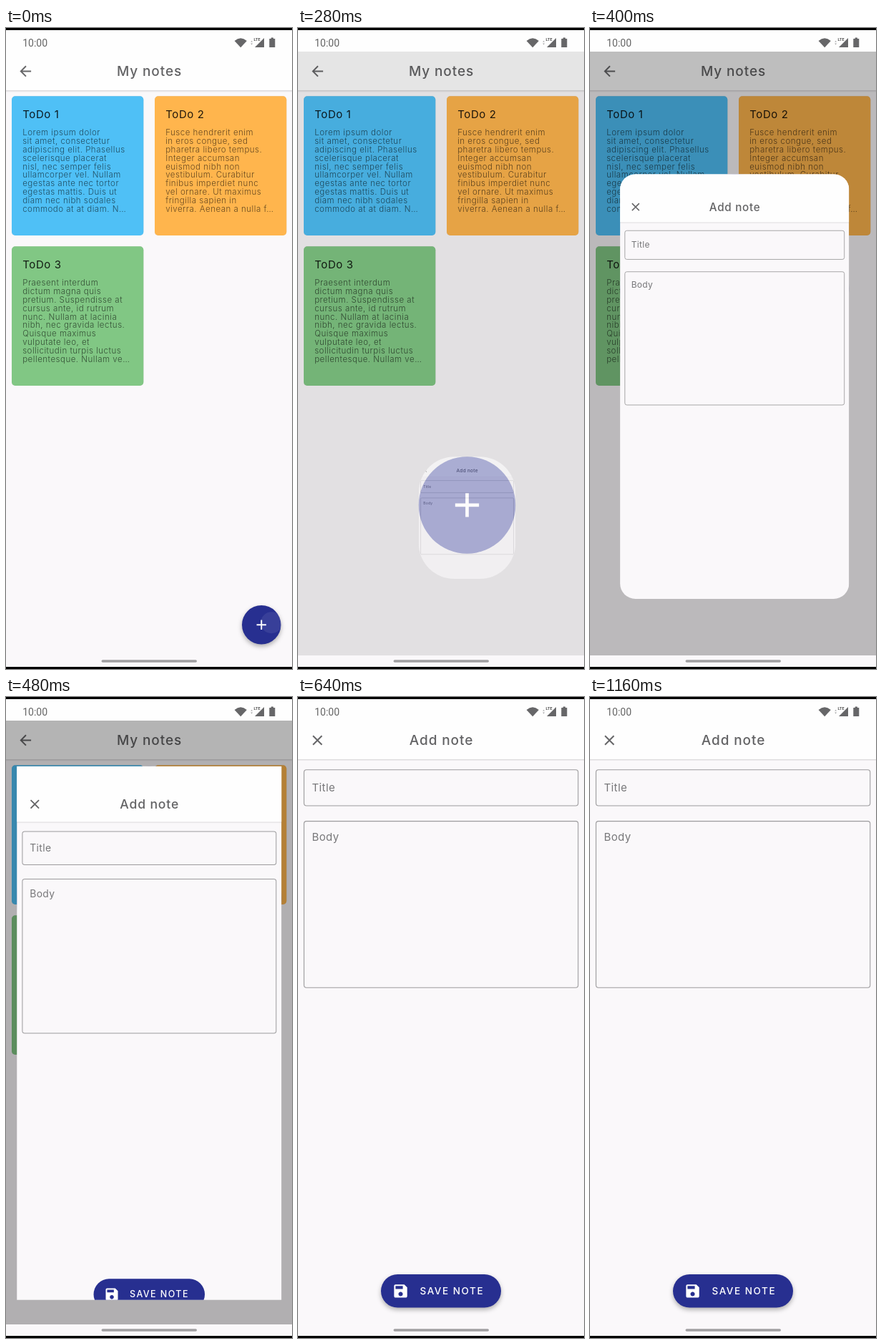
An HTML page for the animation above (1.2 s loop, 400 by 896 pixels).

```html
<!DOCTYPE html>
<html lang="en">
<head>
<meta charset="utf-8">
<title>My notes</title>
<style>
  html, body { margin: 0; width: 100%; height: 100%; overflow: hidden; background: #000; }
  svg { display: block; width: 100%; height: 100%; }
  text { font-family: Inter, "Open Sans", sans-serif; white-space: pre; }
  .bar { font-size: 19px; font-weight: 450; letter-spacing: .9px; fill: #636365; text-anchor: middle; }
  .head { font-size: 15px; letter-spacing: .6px; fill: #000; fill-opacity: .87; }
  .body { font-size: 11.5px; font-weight: 300; letter-spacing: .5px; fill: #000; fill-opacity: .6; }
  .label { font-size: 15px; letter-spacing: .4px; fill: #777779; }
  .save { font-size: 13.5px; font-weight: 500; letter-spacing: 1.55px; fill: #fff; }
  .clock { font: 14px Roboto, sans-serif; fill: #666; }
  .lte { font: bold 5.5px Roboto, sans-serif; fill: #555; }
  .icon { fill: #666668; }
  .field { fill: none; stroke: #9c9b9d; stroke-width: 1.1; }
  .card { filter: drop-shadow(0 .5px .7px rgba(0, 0, 0, .18)); }
  .lift { filter: drop-shadow(0 3px 3px rgba(0, 0, 0, .3)); }
</style>
</head>
<body>
<svg viewBox="0 0 400 896" preserveAspectRatio="none">
  <defs>
    <clipPath id="mask"><rect id="hole"/></clipPath>
    <clipPath id="disc"><circle r="27.25"/></clipPath>
    <path id="arc" d="M357.25 807Q200 807 200 33"/>
    <linearGradient id="fall" x1="0" y1="0" x2="0" y2="1">
      <stop offset="0" stop-color="#000" stop-opacity=".14"/>
      <stop offset="1" stop-color="#000" stop-opacity="0"/>
    </linearGradient>
    <g id="fabFace">
      <circle r="27.25" fill="#272f90"/>
      <path d="M-6.7 0H6.7M0-6.7V6.7" stroke="#fff" stroke-width="1.9"/>
    </g>
  </defs>

  <rect y="3" width="400" height="890" fill="#faf8fa"/>

  <g id="list">
    <rect y="87" width="400" height="3" fill="url(#fall)"/>
    <rect y="3" width="400" height="84" fill="#fefefe"/>
    <path class="icon" transform="translate(15.5 48.7) scale(.98)"
      d="M20 11H7.83l5.59-5.59L12 4l-8 8 8 8 1.41-1.41L7.83 13H20z"/>
    <text class="bar" x="200.5" y="67.3">My notes</text>
    <g id="cards"></g>
    <g id="fab" transform="translate(357.25 834.25)">
      <use href="#fabFace" class="lift"/>
      <circle id="ripple" cx="14" cy="-3" fill="#fff" fill-opacity=".08" clip-path="url(#disc)"/>
    </g>
  </g>

  <rect id="scrim" y="33" width="400" height="844"/>

  <g id="box" clip-path="url(#mask)">
    <use id="start" href="#fabFace"/>
    <g id="page">
      <g transform="translate(0 -3.2)">
        <rect y="3.2" width="400" height="874" fill="#faf8fa"/>
        <rect y="87" width="400" height="2.5" fill="url(#fall)"/>
        <rect y="3.2" width="400" height="83.8" fill="#fefefe"/>
        <path class="icon" transform="translate(15.3 48.6) scale(.99)"
          d="M19 6.41 17.59 5 12 10.59 6.41 5 5 6.41 10.59 12 5 17.59 6.41 19 12 13.41 17.59 19 19 17.59 13.41 12z"/>
        <text class="bar" x="200.5" y="67.3">Add note</text>
        <rect class="field" x="8.4" y="101.8" width="383.4" height="50.2" rx="3.5"/>
        <text class="label" x="19.5" y="131.7">Title</text>
        <rect class="field" x="8.4" y="173.6" width="383.4" height="232.6" rx="3.5"/>
        <text class="label" x="19.5" y="201.4">Body</text>
        <g id="save">
          <rect id="pill" x="116" y="807" width="168" height="46.6" rx="23.3" fill="#272f90"/>
          <path fill="#fff" transform="translate(131.3 818.2) scale(1.02)"
            d="M17 3H5c-1.11 0-2 .9-2 2v14c0 1.1.89 2 2 2h14c1.1 0 2-.9 2-2V7l-4-4zm-5 16c-1.66 0-3-1.34-3-3s1.34-3 3-3 3 1.34 3 3-1.34 3-3 3zm3-10H5V5h10v4z"/>
          <text class="save" x="170.5" y="835.2">SAVE NOTE</text>
        </g>
      </g>
    </g>
  </g>

  <g id="system">
    <text class="clock" x="23.2" y="25.6">10:00</text>
    <g class="icon">
      <path d="M319.6 18Q328.2 10.6 336.8 18L328.2 27.2z"/>
      <path d="M361 14V27H348L355.5 19.5z"/>
      <path d="M342.2 19.6l1.4-1.8 1.4 1.8zM342.2 21.6l1.4 1.8 1.4-1.8z" opacity=".6"/>
      <path d="M370.6 13.6h3.4v1.5h2.3v12h-8v-12h2.3z"/>
    </g>
    <text class="lte" x="346.6" y="18.4">LTE</text>
    <rect x="133.5" y="883.2" width="133.5" height="3.6" rx="1.8" fill="#a09fa1"/>
    <path d="M0 0H400V3H0zM0 893H400V896H0z"/>
  </g>
</svg>
<script>
const $ = id => document.getElementById(id);
const LOOP = 1200, STEP = 40;
const BEGIN = 137, SPAN = 512, SETTLE = 620;
const FAB = 54.5, WIDE = 400, TALL = 844;

const notes = [
  [8, 95.2, '#4fc0f6', 'ToDo 1', `Lorem ipsum dolor
sit amet, consectetur
adipiscing elit. Phasellus
scelerisque placerat
nisl, nec semper felis
ullamcorper vel. Nullam
egestas ante nec tortor
egestas mattis. Duis ut
diam nec nibh sodales
commodo at at diam. N…`],
  [208, 95.2, '#ffb54d', 'ToDo 2', `Fusce hendrerit enim
in eros congue, sed
pharetra libero tempus.
Integer accumsan
euismod nibh non
vestibulum. Curabitur
finibus imperdiet nunc
vel ornare. Ut maximus
fringilla sapien in
viverra. Aenean a nulla f…`],
  [8, 305.2, '#81c784', 'ToDo 3', `Praesent interdum
dictum magna quis
pretium. Suspendisse at
cursus ante, id rutrum
nunc. Nullam at lacinia
nibh, nec gravida lectus.
Quisque maximus
vulputate leo, et
sollicitudin turpis luctus
pellentesque. Nullam ve…`]
];

$('cards').innerHTML = notes.map(([x, y, fill, head, body]) => `
  <g transform="translate(${x} ${y})">
    <rect class="card" width="184.3" height="194.8" rx="5" fill="${fill}"/>
    <text class="head" x="15.2" y="31">${head}</text>
    ${body.split('\n').map((line, i) =>
      `<text class="body" x="15.2" y="${54.8 + i * 11.9}">${line}</text>`).join('')}
  </g>`).join('');

const lerp = (a, b, p) => a + (b - a) * p;
const part = (p, a, b) => Math.min(1, Math.max(0, (p - a) / (b - a)));
const set = (id, attrs) => {
  for (const k in attrs) $(id).setAttribute(k, attrs[k]);
};
const show = (id, on) => set(id, { display: on ? 'inline' : 'none' });

// cubic-bezier(.4, 0, .2, 1)
function ease(x) {
  let lo = 0, hi = 1;
  for (let i = 0; i < 24; i++) {
    const s = (lo + hi) / 2, r = 1 - s;
    if (1.2 * r * r * s + .6 * r * s * s + s ** 3 < x) lo = s; else hi = s;
  }
  return lo * lo * (3 - 2 * lo);
}

const arc = $('arc'), arcLength = arc.getTotalLength();

function grow(e) {
  const size = part(e, .1, 1);
  const top = arc.getPointAtLength(arcLength * e);
  const w = lerp(FAB, WIDE, size), scale = w / WIDE;
  const h = lerp(w, TALL * scale, size);
  const x = top.x - w / 2;
  set('hole', { x, y: top.y, width: w, height: h, rx: w / 2 * (1 - part(e, .1, .9)) });
  set('start', { transform: `translate(${top.x} ${top.y + w / 2}) scale(${w / FAB})` });
  set('page', {
    transform: `translate(${x} ${top.y}) scale(${scale})`,
    opacity: part(e, .14, .42)
  });
  set('scrim', { opacity: .32 * e });
}

function draw(t) {
  const moving = t >= BEGIN && t < SETTLE, done = t >= SETTLE;
  show('fab', t < BEGIN);
  show('box', moving || done);
  show('start', moving);
  show('scrim', moving);
  show('list', !done);
  set('ripple', { r: 15 + t * .22 });
  set('save', { transform: `translate(0 ${done ? 0 : -29.8})` });
  set('pill', { class: done ? 'lift' : '' });
  if (moving) grow(ease((t - BEGIN) / SPAN));
  if (done) {
    set('hole', { x: 0, y: 3, width: 400, height: 890, rx: 0 });
    set('page', { transform: 'translate(0 3.2)', opacity: 1 });
  }
}

const origin = performance.now();
function tick() {
  const t = (performance.now() - origin) % LOOP;
  draw(Math.floor(t / STEP) * STEP);
  requestAnimationFrame(tick);
}
tick();
</script>
</body>
</html>
```
